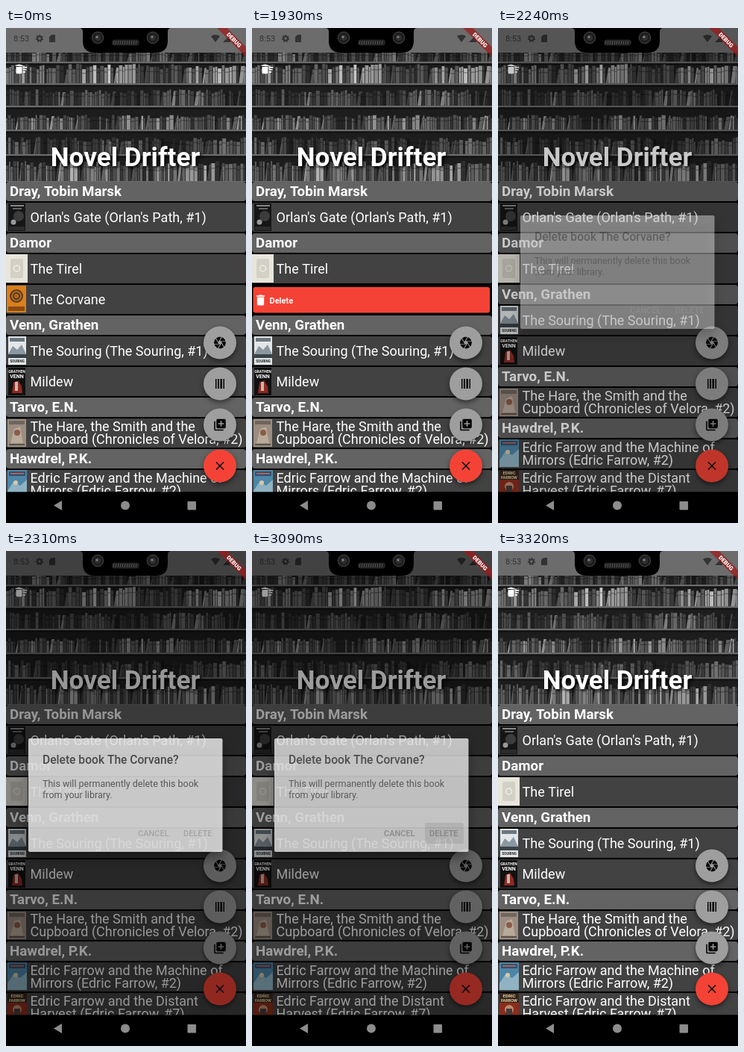
Recreate the animation shown at these times as an HTML page with a canvas. Size 322 by 663 pixels, loop 4.02 s.

```html
<!DOCTYPE html>
<html lang="en">
<head>
<meta charset="utf-8">
<style>
html, body { margin: 0; width: 100%; height: 100%; overflow: hidden; background: #000; }
canvas { display: block; width: 322px; height: 663px; }
</style>
</head>
<body>
<canvas></canvas>
<script>
const W = 322, H = 663, LOOP = 4020;
const FONT = 'Roboto, sans-serif';
const canvas = document.querySelector('canvas');
const ratio = window.devicePixelRatio || 1;
canvas.width = W * ratio;
canvas.height = H * ratio;
let ctx = canvas.getContext('2d');

// The picture is sampled about every 77 ms: [time, value] pairs hold until the next.
const swipe = [[0, 0], [1540, 10], [1620, 72], [1700, 162], [1770, 242], [1850, 300], [1930, 330]];
const dialog = [[0, 0], [2160, .1], [2240, .4], [2310, .76], [2390, 1],
  [3090, .72], [3170, .4], [3240, .12], [3320, 0]];
const REMOVED_AT = 2160;
const held = (keys, t) => keys.filter(k => k[0] <= t).pop()[1];

const trash = new Path2D('M6 19c0 1.1.9 2 2 2h8c1.1 0 2-.9 2-2V7H6v12zM19 4h-3.5l-1-1h-5l-1 1H5v2h14V4z');
const sweep = new Path2D('M15 16h4v2h-4zm0-8h7v2h-7zm0 4h6v2h-6zM3 18c0 1.1.9 2 2 2h6c1.1 0 2-.9 2-2V8H3v10zM14 5h-3l-1-1H6L5 5H2v2h12z');
const addBook = new Path2D('M4 6H2v14c0 1.1.9 2 2 2h14v-2H4V6zm16-4H8c-1.1 0-2 .9-2 2v12c0 1.1.9 2 2 2h12c1.1 0 2-.9 2-2V4c0-1.1-.9-2-2-2zm-1 9h-4v4h-2v-4H9V9h4V5h2v4h4v2z');
const shutter = new Path2D('M9.4 10.5l4.77-8.26C13.47 2.09 12.75 2 12 2c-2.4 0-4.6.85-6.32 2.25l3.66 6.35.06-.1zM21.54 9c-.92-2.92-3.15-5.26-6-6.34L11.88 9h9.66zm.26 1h-7.49l.29.5 4.76 8.25C21 16.97 22 14.61 22 12c0-.69-.07-1.35-.2-2zM8.54 12l-3.9-6.75C3.01 7.03 2 9.39 2 12c0 .69.07 1.35.2 2h7.49l-1.15-2zm-6.08 3c.92 2.92 3.15 5.26 6 6.34L12.12 15H2.46zm11.27 0l-3.9 6.76c.7.15 1.42.24 2.17.24 2.4 0 4.6-.85 6.32-2.25l-3.66-6.35-.93 1.6z');
const notch = new Path2D('M98 0Q103 0 103 5V17Q103 33 119 33H201Q217 33 217 17V5Q217 0 222 0Z');

function rect(x, y, w, h, color, r = 0) {
  ctx.fillStyle = color;
  ctx.beginPath();
  ctx.roundRect(x, y, w, h, r);
  ctx.fill();
}
function disc(x, y, r, color) {
  ctx.fillStyle = color;
  ctx.beginPath();
  ctx.arc(x, y, r, 0, 7);
  ctx.fill();
}
function ring(x, y, r, color, width = 1) {
  ctx.strokeStyle = color;
  ctx.lineWidth = width;
  ctx.beginPath();
  ctx.arc(x, y, r, 0, 7);
  ctx.stroke();
}
function shape(points, color) {
  ctx.fillStyle = color;
  ctx.beginPath();
  points.forEach(p => ctx.lineTo(...p));
  ctx.fill();
}
function line(x1, y1, x2, y2, color, width) {
  ctx.strokeStyle = color;
  ctx.lineWidth = width;
  ctx.beginPath();
  ctx.moveTo(x1, y1);
  ctx.lineTo(x2, y2);
  ctx.stroke();
}
function text(s, x, y, size, color = '#fff', weight = 400, align = 'left') {
  ctx.font = `${weight} ${size}px ${FONT}`;
  ctx.textAlign = align;
  ctx.fillStyle = color;
  ctx.fillText(s, x, y);
}
function icon(path, cx, cy, size, color) {
  ctx.save();
  ctx.translate(cx - size / 2, cy - size / 2);
  ctx.scale(size / 24, size / 24);
  ctx.fillStyle = color;
  ctx.fill(path);
  ctx.restore();
}

// Book covers, drawn from the top left of a row
const covers = {
  record() {
    rect(3, 1, 23, 37, '#161616');
    rect(6, 3, 18, 2, '#888');
    rect(9, 7, 12, 2, '#666');
    disc(17, 18, 7, '#3c3c3c');
    disc(10, 26, 3.5, '#999');
    rect(4, 32, 21, 5, '#2c2c2c');
  },
  pale() {
    rect(0, 0, 29, 38, '#e8e5dc');
    rect(6, 6, 17, 26, '#d3d0c6', 2);
    ring(14.5, 19, 4, '#efede5', 1.5);
  },
  orange() {
    rect(1, 1, 26, 36, '#d9801c');
    disc(14, 15, 9, '#5a3c22');
    ring(14, 15, 6, '#c9781f', 1.5);
    disc(14, 15, 3, '#b06a20');
    rect(3, 29, 22, 6, '#8a4a14');
  },
  snow() {
    rect(3, 0, 24, 38, '#e3e6e8');
    rect(5, 2, 20, 5, '#6c7780');
    shape([[3, 24], [9, 13], [15, 18], [21, 11], [27, 24]], '#8a97a1');
    rect(3, 24, 24, 5, '#39434a');
    text('SOURING', 15, 35, 4.6, '#222', 700, 'center');
  },
  night() {
    rect(3, 1, 23, 37, '#111');
    text('GRATHEN', 14.5, 8, 5, '#fff', 700, 'center');
    text('VENN', 14.5, 15, 7, '#fff', 700, 'center');
    shape([[8, 35], [10, 21], [16, 18], [21, 26], [22, 35]], '#8d2a22');
    rect(12, 20, 4, 12, '#c9b8ac');
  },
  tan() {
    rect(2, 1, 25, 37, '#9b8d80');
    rect(4, 3, 21, 5, '#6f665e');
    shape([[6, 33], [11, 14], [19, 11], [23, 33]], '#b8aa99');
    disc(15, 19, 4, '#8c5a48');
    rect(4, 34, 21, 2, '#5c524a');
  },
  blue() {
    rect(2, 0, 26, 37, '#4d86a8');
    rect(4, 2, 22, 6, '#35506f');
    rect(6, 4, 18, 1.5, '#c76a55');
    shape([[2, 28], [10, 16], [19, 21], [28, 13], [28, 37], [2, 37]], '#8fb3c3');
    disc(13, 17, 3, '#d9c9a8');
  },
  red() {
    rect(2, 0, 26, 37, '#8c2c1c');
    rect(2, 0, 26, 13, '#35241d');
    text('EDRIC', 15, 6, 6, '#e8d9a0', 700, 'center');
    text('FARROW', 15, 12, 5.5, '#e8d9a0', 700, 'center');
    disc(15, 22, 6, '#b98a70');
    rect(11, 21, 8, 12, '#433a3a');
  }
};

const swiped = { cover: 'orange', lines: ['The Corvane'] };
const list = [
  'Dray, Tobin Marsk',
  { cover: 'record', lines: ["Orlan's Gate (Orlan's Path, #1)"] },
  'Damor',
  { cover: 'pale', lines: ['The Tirel'] },
  swiped,
  'Venn, Grathen',
  { cover: 'snow', lines: ['The Souring (The Souring, #1)'] },
  { cover: 'night', lines: ['Mildew'] },
  'Tarvo, E.N.',
  { cover: 'tan', lines: ['The Hare, the Smith and the', 'Cupboard (Chronicles of Velora, #2)'] },
  'Hawdrel, P.K.',
  { cover: 'blue', lines: ['Edric Farrow and the Machine of', 'Mirrors (Edric Farrow, #2)'] },
  { cover: 'red', lines: ['Edric Farrow and the Distant', 'Harvest (Edric Farrow, #7)'] }
];

function paintShelves() {
  const sheet = document.createElement('canvas');
  sheet.width = W;
  sheet.height = 206;
  const screen = ctx;
  ctx = sheet.getContext('2d');
  let seed = 11;
  const random = () => (seed = seed * 16807 % 2147483647) / 2147483647;
  rect(0, 0, W, 206, '#1d1d1d');
  // base of the shelf, tallest book, brightness
  [[45, 14, 130], [74, 26, 205], [104, 22, 135],
   [136, 20, 180], [169, 23, 115], [205, 27, 190]].forEach(([base, tall, light], row) => {
    for (let x = 0; x < W;) {
      const w = 2 + random() * 4;
      const h = tall * (.7 + random() * .3);
      const group = .8 + .2 * Math.sin(x / 23 + row * 2);
      const v = Math.round(light * group * (.3 + .7 * random()));
      const lean = random() > .85 ? 3 : 0;
      shape([[x, base], [x + lean, base - h], [x + lean + w - .7, base - h], [x + w - .7, base]],
        `rgb(${v},${v},${v})`);
      rect(x, base - h * .75, w - .7, 1.5, 'rgba(0,0,0,.3)');
      x += w;
    }
    rect(0, base, W, 2.5, '#6a6a6a');
    rect(0, base + 2.5, W, 2, '#101010');
  });
  ctx = screen;
  return sheet;
}
const shelves = paintShelves();

function drawHeader() {
  ctx.drawImage(shelves, 0, 0);
  rect(0, 0, W, 33, '#6c6c6c');
  text('8:53', 10, 18, 11, '#333');
  ctx.setLineDash([1.9, 1.9]);
  ring(45, 14, 4.3, '#333', 1.6);
  ctx.setLineDash([]);
  ring(45, 14, 2.8, '#333', 2);
  shape([[61, 9], [66, 9], [66, 19], [58, 19], [58, 12]], '#333');
  shape([[275, 11], [278, 9.5], [281, 9], [284, 9.5], [287, 11], [281, 19]], '#333');
  shape([[291, 19], [301, 9], [301, 19]], '#333');
  icon(sweep, 20.5, 55, 18.7, '#fff');
  ctx.save();
  ctx.shadowColor = '#000';
  ctx.shadowBlur = 4 * ratio;
  ctx.shadowOffsetX = ctx.shadowOffsetY = 2 * ratio;
  text('Novel Drifter', 160, 185, 35.2, '#fff', 700, 'center');
  ctx.restore();
}

function drawBook(book, x, y) {
  ctx.save();
  ctx.translate(x, y);
  rect(0, 0, W, 39, '#424242', 3);
  covers[book.cover]();
  const first = book.lines.length > 1 ? 16.5 : 25.5;
  book.lines.forEach((s, i) => text(s, 32.5, first + i * 17.7, 18));
  ctx.restore();
}

function drawList(t) {
  ctx.save();
  ctx.beginPath();
  ctx.rect(0, 206, W, 415.5);
  ctx.clip();
  let y = 206;
  for (const entry of list) {
    if (typeof entry === 'string') {
      rect(0, y, W, 26, '#636363', 4);
      text(entry, 5, y + 18.5, 18.8, '#fff', 700);
      y += 28;
      continue;
    }
    if (entry === swiped && t >= REMOVED_AT) continue;
    const dx = entry === swiped ? held(swipe, t) : 0;
    if (dx) {
      rect(1.5, y + 3, 317.5, 34.5, '#f44336', 3);
      icon(trash, 11.5, y + 20.5, 18.7, '#fff');
      text('Delete', 23.5, y + 24.5, 11, '#fff', 700);
    }
    drawBook(entry, dx, y);
    y += 41;
  }
  ctx.restore();
}

function drawButtons() {
  const x = 287;
  [421.5, 476.5, 531.5, 586.5].forEach((y, i) => {
    ctx.save();
    ctx.shadowColor = 'rgba(0,0,0,.5)';
    ctx.shadowBlur = 6 * ratio;
    ctx.shadowOffsetY = 3 * ratio;
    disc(x, y, 22, i < 3 ? '#9e9e9e' : '#f44336');
    ctx.restore();
  });
  icon(shutter, x, 421.5, 18.7, '#000');
  [[281, 1.5], [284, 2], [287.5, 2.5], [291.5, 1.5]].forEach(([bx, w]) => rect(bx, 470, w, 13, '#000'));
  icon(addBook, x, 531.5, 18.7, '#000');
  line(x - 5, 581.5, x + 5, 591.5, '#000', 1.5);
  line(x - 5, 591.5, x + 5, 581.5, '#000', 1.5);
}

function drawDialog(alpha, pressed) {
  rect(0, 0, W, 621.5, `rgba(0,0,0,${.54 * alpha})`);
  ctx.save();
  ctx.globalAlpha = alpha;
  ctx.shadowColor = 'rgba(0,0,0,.5)';
  ctx.shadowBlur = 14 * ratio;
  ctx.shadowOffsetY = 8 * ratio;
  rect(30, 251, 260.5, 152, '#fff', 2);
  ctx.shadowColor = 'transparent';
  if (pressed) rect(232, 364, 52, 28, 'rgba(0,0,0,.12)', 2);
  text('Delete book The Corvane?', 49, 285, 15.6, '#212121', 500);
  text('This will permanently delete this book', 49, 315.5, 12.5, '#333');
  text('from your library.', 49, 331, 12.5, '#333');
  const label = pressed ? '#757575' : '#9a9a9a';
  text('CANCEL', 177, 381.5, 11, label, 500);
  text('DELETE', 238, 381.5, 11, label, 500);
  ctx.restore();
}

function drawPhone() {
  ctx.save();
  ctx.translate(W, 0);
  ctx.rotate(Math.PI / 4);
  rect(-40, 18, 80, 9.4, 'rgba(160,24,24,.7)');
  text('DEBUG', 0, 25.4, 7.6, '#fff', 900, 'center');
  ctx.restore();

  ctx.fillStyle = '#000';
  ctx.fill(notch);
  for (const x of [123, 197]) {
    disc(x, 13, 8.5, '#1d1d1d');
    ring(x, 13, 7.5, '#444');
    disc(x, 13, 4, '#303030');
    disc(x - 1, 12, 1.5, '#888');
  }
  rect(142, 15.5, 37, 8, '#222', 4);
  for (let i = 0; i < 11; i++) line(145 + i * 3, 17, 144 + i * 3, 22, '#555', 1);

  rect(0, 621.5, W, 42, '#000');
  shape([[64, 639.5], [75, 633], [75, 646]], '#8c8c8c');
  disc(160, 639.5, 6, '#8c8c8c');
  rect(243.5, 634, 11.5, 11.5, '#8c8c8c', 1);
}

function render() {
  const t = performance.now() % LOOP;
  ctx.setTransform(ratio, 0, 0, ratio, 0, 0);
  rect(0, 0, W, H, '#000');
  drawHeader();
  drawList(t);
  drawButtons();
  const shown = held(dialog, t);
  if (shown) drawDialog(shown, t >= 3090);
  drawPhone();
  requestAnimationFrame(render);
}
render();
</script>
</body>
</html>
```
